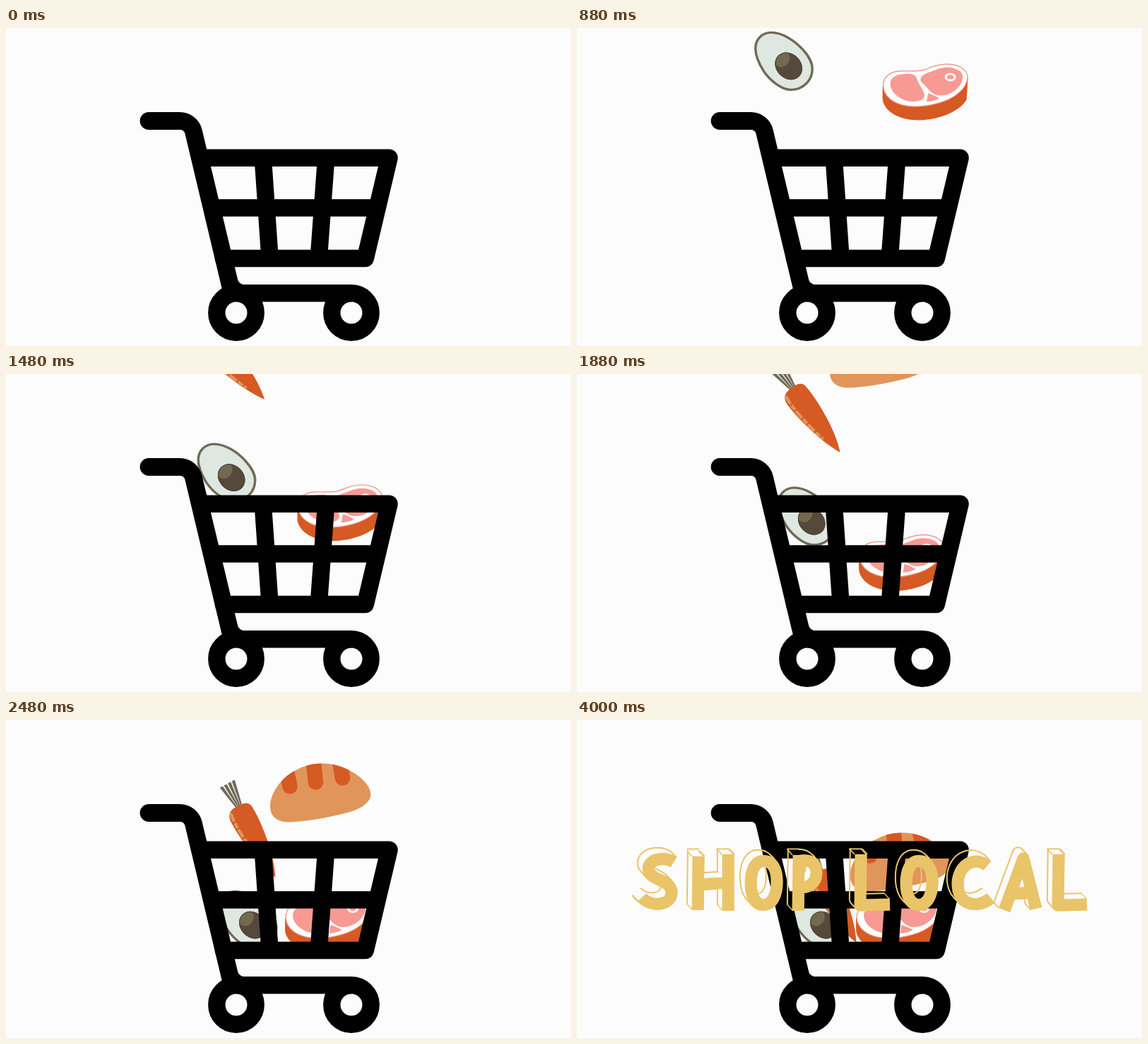
Write an HTML page with a canvas that moves like this. It is 800 px wide and 450 px high and loops after 5 s.

```html
<!DOCTYPE html>
<html lang="en">
<head>
<meta charset="utf-8">
<title>Shop local</title>
<style>
  html, body { margin: 0; width: 100%; height: 100%; overflow: hidden; background: #fcfcfc; }
  canvas { display: block; }
</style>
</head>
<body>
<canvas id="stage" width="800" height="450" role="img" aria-label="SHOP LOCAL"></canvas>
<script>
const LOOP = 5000, STEP = 40, TEXT_AT = 4000;
const ctx = document.getElementById('stage').getContext('2d');
const ORANGE = '#d55a23', CRUST = '#e0955b', PINK = '#f79a93', OLIVE = '#706a56', GOLD = '#e9c469';

const path = d => new Path2D(d);
const fill = (d, color) => { ctx.fillStyle = color; ctx.fill(path(d)); };
const stroke = (d, color, width, g = ctx) => {
  g.strokeStyle = color;
  g.lineWidth = width;
  g.stroke(path(d));
};
const oval = (x, y, rx, ry, color, turn = 0) => {
  ctx.fillStyle = color;
  ctx.beginPath();
  ctx.ellipse(x, y, rx, ry, turn, 0, 7);
  ctx.fill();
};

// Straight drop: offset is (x, y) at time `at`, frozen after `end`.
function drop(t, { at, end, vx, vy, x = 0, y = 0 }, draw) {
  const dt = Math.min(t, end) - at;
  ctx.save();
  ctx.translate(x + vx * dt, y + vy * dt);
  draw(t);
  ctx.restore();
}

function avocado() {
  const skin = 'M283 43.5C297 43.5 314 53 327 67C336 77 341 85 341 95C341 112 327 124.5 311 124.5' +
    'C297 124.5 281 111 272 98C264 85 260.5 76 260.5 66C260.5 53 270 43.5 283 43.5Z';
  fill(skin, '#dfe8e0');
  stroke(skin, OLIVE, 3.4);
  ctx.save();
  ctx.beginPath();
  ctx.ellipse(307.5, 91, 21, 17.5, Math.PI / 4, 0, 7);
  ctx.clip();
  oval(307, 91, 30, 30, '#54493b');
  oval(298, 81, 10.5, 12, '#736850', 0.6);
  ctx.restore();
  ctx.beginPath();
  ctx.ellipse(307.5, 91, 20.5, 17, Math.PI / 4, 0, 7);
  ctx.strokeStyle = '#4b4232';
  ctx.lineWidth = 1;
  ctx.stroke();
}

function steak() {
  fill('M442 34L442 51C444 68 464 81 494 81C526 80 552 67 561 52L563 20Z', ORANGE);
  const face = 'M443 32C443 19 453 12 468 11.5C480 11 489 13 500 10C512 6 518 2 532 1.7' +
    'C548 1.5 562 8 562.5 20C562 36 544 51 521 57C503 62 482 64 465 58C451 53 443 43 443 32Z';
  fill(face, '#fff');
  stroke(face, '#f0897c', 1.2);
  fill('M453 31C452 22 460 16 473 15.5C482 15 488 16 490 21C493 31 501 38 501.5 46' +
    'C501 53 492 55 482 54.5C467 53 454 42 453 31Z', PINK);
  fill('M496 22C498 15 509 13 517 10C526 6 537 5 547 9C557 13 558 22 552 31' +
    'C546 40 535 46 524 46C513 46 508 38 502 32C498 28 495 26 496 22Z', PINK);
  fill('M507 43C513 45 518 47 522.5 50C518 53 511 54.5 504 55C506 51 505 46 507 43Z', PINK);
  oval(538, 20, 8, 6, '#fff');
  oval(538, 20, 4.6, 3.2, PINK);
}

function carrot(t) {
  const now = Math.max(1500, Math.min(2480, t));
  ctx.rotate((61.9 + (now - 2480) * 0.0155) * Math.PI / 180);
  for (let i = 0; i < 4; i++) {
    const tip = 7.2 - i * 6.4, base = 1.5 - i * 2.3;
    fill(`M-92 ${tip + 2.3}L-92 ${tip - 2.3}L-54 ${base - 1}L-54 ${base + 1}Z`, OLIVE);
  }
  const root = 'M-57 0C-58 -10 -55 -17 -48 -18C-30 -20 25 -16 57 0C25 14 -30 20 -46 18C-55 16 -58 9 -57 0Z';
  fill(root, ORANGE);
  ctx.save();
  ctx.clip(path(root));
  ctx.setLineDash([13, 2.5, 8, 2]);
  stroke('M-53 13C-35 16 0 13 28 8', CRUST, 4.5);
  ctx.restore();
}

function bread() {
  const loaf = 'M374 124C373 108 385 88 402 76C418 65 435 61 450 61.5C470 62 487 70 500 80' +
    'C512 90 518 99 516 109C513 119 500 127 480 132C455 138 430 143 403 144.5C385 145 375 138 374 124Z';
  fill(loaf, CRUST);
  ctx.save();
  ctx.clip(path(loaf));
  ctx.lineCap = 'round';
  stroke('M396 66L402 94M435 56L438.5 88M472 56L476.5 82', ORANGE, 21.5);
  ctx.restore();
}

function cart() {
  ctx.save();
  ctx.strokeStyle = ctx.fillStyle = '#000';
  ctx.lineWidth = 24.8;
  ctx.lineCap = ctx.lineJoin = 'round';
  ctx.beginPath();
  ctx.moveTo(202, 131.5);
  ctx.arcTo(261.9, 131.5, 316.8, 362, 20);
  ctx.lineTo(318.5, 369);
  ctx.stroke();
  stroke('M278 183.8L542.5 183.8L508.8 326L308 326', '#000', 24.6);
  ctx.lineCap = 'butt';
  stroke('M285 254.6L525 254.6M363.8 184L373.6 326M453.2 184L442.8 326M326 375.2L489 375.2', '#000', 24.5);
  fill('M322 340L323.5 340L327 354Q329.5 363 339 363.5L320 366Z', '#000');
  ctx.lineWidth = 24.4;
  for (const x of [326, 489]) {
    ctx.beginPath();
    ctx.arc(x, 403, 27.7, 0, 7);
    ctx.stroke();
  }
  ctx.restore();
}

// Lettering: solid faces, with a hollow block edge running up and to the left.
const letters = [
  'M137 201C124 193 101 196 101 211C102 227 134 225 134 245C133 262 106 266 92 251',
  'M172 193L171 269M214 190L214 270M172 233L214 230',
  'M264 199.5C277 199.5 283 212 283 229C283 248 276 261.5 264 261.5C252 261.5 246 248 246 231C246 213 252 199.5 264 199.5Z',
  'M314 191L313 270M313 200C330 196 339 203 339 216C339 231 328 238 313 237',
  'M402 190L401 262L443 261',
  'M484 199.5C497 199.5 503 212 503 229C503 248 496 261.5 484 261.5C472 261.5 466 248 466 231C466 213 472 199.5 484 199.5Z',
  'M581 206C565 193 541 202 539 230C538 262 566 268 586 252',
  'M605 269L632 196L650 267M615 246L645 244',
  'M682 190L681 262L722 261'
].join('');
const creases = [[163, 193], [181, 193], [205, 190], [223, 190], [305, 191], [393, 190],
  [411, 190], [673, 190], [691, 190], [86, 257], [597, 266]];

function makeSign() {
  const sheet = document.createElement('canvas');
  sheet.width = 800;
  sheet.height = 450;
  const g = sheet.getContext('2d');
  g.lineJoin = 'round';
  const sweep = width => {
    for (let i = 0; i <= 16; i++) {
      g.save();
      g.translate(-i * 0.48, -i * 0.52);
      stroke(letters, GOLD, width, g);
      g.restore();
    }
  };
  sweep(17);
  g.globalCompositeOperation = 'destination-out';
  g.lineCap = 'butt';
  sweep(13);
  g.globalCompositeOperation = 'source-over';
  for (const [x, y] of creases) stroke(`M${x} ${y}l-7.5 -8`, GOLD, 1.8, g);
  for (const x of [172, 214, 314, 402, 682]) stroke(`M${x - 16.5} 182.5h17.5`, GOLD, 1.8, g);
  stroke(letters, GOLD, 17, g);
  return sheet;
}
const sign = makeSign();

function draw(t) {
  ctx.fillStyle = '#fcfcfc';
  ctx.fillRect(0, 0, 800, 450);
  drop(t, { at: 1120, end: 2409, vx: 0.0325, vy: 0.1545 }, avocado);
  drop(t, { at: 2480, end: 3000, vx: 0.0275, vy: 0.178, x: 354.5, y: 172.5 }, carrot);
  drop(t, { at: 2480, end: 2951, vx: 0.027, vy: 0.2083 }, bread);
  drop(t, { at: 600, end: 2000, vx: -0.0335, vy: 0.1765 }, steak);
  cart();
  if (t >= TEXT_AT) ctx.drawImage(sign, 0, 0);
}

const start = performance.now();
function tick() {
  const t = (performance.now() - start) % LOOP;
  draw(Math.floor(t / STEP) * STEP);
  requestAnimationFrame(tick);
}
tick();
</script>
</body>
</html>
```
